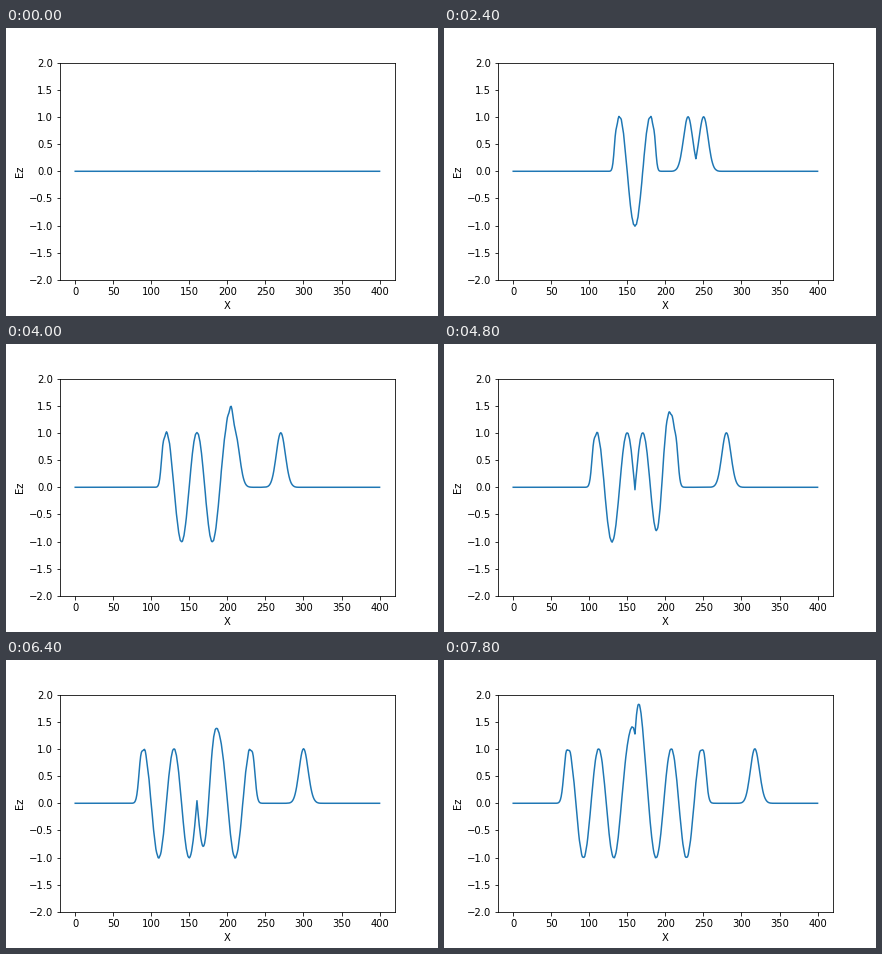
Recreate the animation shown at these times as a matplotlib script. Size 432 px wide and 288 px high, loop 8 s.

```python
import math

import matplotlib.pyplot as plt
import numpy as np
from matplotlib.animation import FuncAnimation

CELLS = 401
FRAMES = 40
STEPS_PER_FRAME = 5
COURANT = 0.5

SINE_CELL, PERIOD = 160, 80
PULSE_CELL, PULSE_DELAY, PULSE_SPREAD = 240, 40, 12


def simulate():
    """Run a 1D FDTD grid with two soft sources; return one Ez row per frame."""
    ez = np.zeros(CELLS)
    hy = np.zeros(CELLS)
    rows = []
    for step in range((FRAMES - 1) * STEPS_PER_FRAME + 1):
        ez[1:] += COURANT * (hy[:-1] - hy[1:])
        ez[SINE_CELL] += math.sin(2 * math.pi * step / PERIOD)
        ez[PULSE_CELL] += math.exp(-0.5 * ((step - PULSE_DELAY) / PULSE_SPREAD) ** 2)
        hy[:-1] += COURANT * (ez[:-1] - ez[1:])
        if step % STEPS_PER_FRAME == 0:
            rows.append(ez.copy())
    return rows


fields = simulate()

fig, ax = plt.subplots(figsize=(6, 4), dpi=72)
fig.subplots_adjust(left=0.125, right=0.9, bottom=0.125, top=0.88)
line, = ax.plot(np.arange(CELLS), fields[0], color="tab:blue", lw=1.5)
ax.set_xlim(-20, 420)
ax.set_ylim(-2, 2)
ax.set_xlabel("X")
ax.set_ylabel("Ez")


def draw(frame):
    line.set_ydata(fields[frame])
    return line,


anim = FuncAnimation(fig, draw, frames=FRAMES, interval=200,
                     repeat=True, repeat_delay=0)
plt.show()
```
